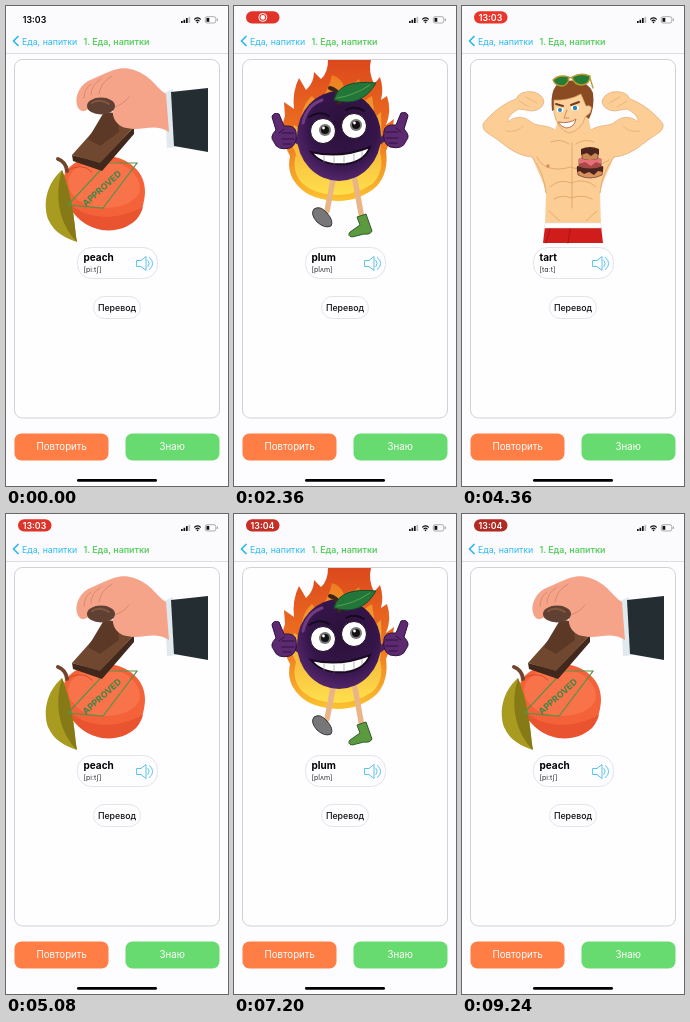
Animation of 222x480 px, one loop 9.28 s. Source, as an HTML page:

```html
<!DOCTYPE html>
<html lang="ru">
<head>
<meta charset="utf-8">
<style>
  html, body { margin: 0; width: 100%; height: 100%; overflow: hidden; background: #fdfcfe; }
  svg { display: block; width: 100%; height: 100%; }
  text { font-family: Inter, "Noto Sans", sans-serif; }
  .frame { fill: #fefdff; stroke: #d3d0d6; }
  .chip { fill: #fefdff; stroke: #e6e2ea; }
  .line { fill: none; stroke-linecap: round; stroke-linejoin: round; }
  .mid { text-anchor: middle; }
</style>
</head>
<body>
<svg viewBox="0 0 222 480">
  <defs>
    <linearGradient id="fire" x2="0" y2="1">
      <stop stop-color="#dc481d"/>
      <stop offset=".55" stop-color="#ee7420"/>
      <stop offset="1" stop-color="#fbc32f"/>
    </linearGradient>
    <linearGradient id="innerFire" x2="0" y2="1">
      <stop stop-color="#ee7d20"/>
      <stop offset="1" stop-color="#fee04d"/>
    </linearGradient>
    <radialGradient id="skin" cx=".55" cy=".4" r=".62">
      <stop stop-color="#2a1038"/>
      <stop offset=".65" stop-color="#35154a"/>
      <stop offset="1" stop-color="#55276d"/>
    </radialGradient>

    <g id="peach">
      <path fill="#f4623a" d="M57 178C56 160 75 150 98 150C122 150 140 166 139 187C138 200 134 210 130 214C120 223 105 226 92 222C72 219 58 198 57 178Z"/>
      <path fill="#f9734a" d="M62 176C64 161 80 154 98 155C120 155 135 169 134 185C126 205 88 206 72 194C66 189 62 183 62 176Z"/>
      <path fill="#e9532f" d="M60 194C78 214 108 216 137 201C134 212 126 218 117 222C94 230 70 218 60 194Z"/>
      <path class="line" stroke="#d94a2c" d="M59 166Q76 155 86 166"/>
      <path class="line" stroke="#70452b" stroke-width="4" d="M52 153Q60 156 61 165"/>
      <path fill="#a99a20" d="M56 164C40 178 37 198 42 213C48 227 60 232 71 236C68 218 68 194 56 164Z"/>
      <path fill="#857a16" d="M56 164C48 190 53 218 71 236C68 218 68 194 56 164Z"/>
      <path fill="none" stroke="#5a9147" stroke-width="1.2" d="M62 199L101 157H131L97 202Z"/>
      <text transform="translate(80 201) rotate(-42)" font-size="8.8" font-weight="700" fill="#398746">APPROVED</text>
      <path fill="#41281c" d="M66 149L94 156L128 121V128L96 165L67 155Z"/>
      <path fill="#70482f" d="M66 149L99 112L128 121L94 157Z"/>
      <path fill="#5c3927" d="M82 133L98 106L111 107L113 126L94 140Z"/>
      <path fill="#e0eaee" d="M158 87L167 83L171 141L161 142Z"/>
      <path fill="#242e32" d="M165 86L202 82V146L168 140Z"/>
      <path fill="#f5a489" d="M160 88C150 82 146 70 128 64C116 60 108 64 100 67L82 75C72 81 69 92 71 99C73 107 80 107 85 100C91 91 102 92 108 101C104 110 111 121 121 122C136 126 148 116 163 126Z"/>
      <path class="line" stroke="#d88b6d" d="M85 78Q78 83 78 92M95 73Q85 79 85 89M106 70Q94 77 93 88M108 101Q117 99 123 91"/>
      <ellipse cx="95" cy="100" rx="14" ry="8.5" fill="#604032"/>
      <path class="line" stroke="#805640" stroke-width="2" d="M86 97Q94 92 103 98"/>
    </g>

    <g id="plum">
      <path fill="url(#fire)" d="M56 150Q44 128 51 110L50 96L60 103Q58 86 65 72L72 84Q80 77 80 66L87 73Q94 67 94 54H137Q134 65 140 78L146 71Q150 83 147 94L153 90Q158 105 152 119L160 113Q158 132 152 145Q155 166 143 180Q126 195 104 195Q77 194 65 181Q52 168 56 150Z"/>
      <path fill="url(#innerFire)" d="M62 148Q54 133 60 119L67 123Q66 100 78 90L84 97Q95 85 98 69Q109 72 111 85L125 73L130 95L138 90L141 111L147 106Q148 130 146 146Q151 166 138 178Q122 189 104 189Q82 189 69 178Q57 166 62 148Z"/>
      <path class="line" stroke="#eab586" stroke-width="5.5" d="M99 174L93 205M121 174L128 213"/>
      <path fill="#77777a" stroke="#39393c" d="M80 203Q86 199 93 207Q100 215 97 220Q91 223 83 216Q76 208 80 203Z"/>
      <path fill="#5c9a40" stroke="#335d2d" d="M123 211L132 208L138 225Q136 229 130 228L118 231Q113 230 116 226L126 219Z"/>
      <path class="line" stroke="#492359" stroke-width="6" d="M57 131L67 137M154 129L145 136"/>
      <g id="thumb" fill="#5d2a72" stroke="#2d123c">
        <path d="M42 124L38 111Q39 106 45 108L50 120Q61 119 62 126Q64 138 56 142Q43 145 40 136Q35 131 42 124Z"/>
        <path class="line" d="M50 123L45 127M60 127H48M60 133H48M57 138H49"/>
      </g>
      <use href="#thumb" transform="translate(212 -1) scale(-1 1)"/>
      <ellipse cx="105" cy="130" rx="42" ry="45" fill="url(#skin)"/>
      <path class="line" stroke="#6f3b83" stroke-width="3" d="M69 117Q73 99 88 94"/>
      <path class="line" stroke="#3e251a" stroke-width="4" d="M105 97Q107 85 96 82"/>
      <path fill="#23763a" stroke="#174f2a" d="M100 94Q105 73 142 77Q128 102 100 94Z"/>
      <path class="line" stroke="#59a24a" d="M103 92Q119 90 136 79"/>
      <g id="eye">
        <circle cx="89" cy="125" r="12.5" fill="#fff" stroke="#1c0a25"/>
        <circle cx="91" cy="124" r="6" fill="#777"/>
        <circle cx="91" cy="124" r="4" fill="#111"/>
        <circle cx="89.5" cy="122" r="1.4" fill="#fff"/>
      </g>
      <use href="#eye" x="31" y="-5"/>
      <path class="line" stroke="#160a1c" stroke-width="2" d="M75 111Q86 104 95 110M112 104Q121 99 130 105"/>
      <path fill="#fff" stroke="#190a20" stroke-width="2" d="M77 146Q106 153 136 141Q131 155 112 158Q88 160 77 146Z"/>
      <path class="line" stroke="#999" stroke-width=".7" d="M90 150V156M100 151V158M110 150V157M120 148V155M128 145V151"/>
    </g>

    <g id="tart">
      <g id="arm" stroke="#e3b278" stroke-width=".8">
        <path fill="#fccd95" d="M93 124C84 118 75 121 69 116C60 108 50 112 46 116C45 111 51 106 57 103L70 105Q80 104 82 96Q81 89 72 86Q58 84 54 93C42 97 28 108 21 118Q20 124 27 128C41 136 50 149 70 151L92 155Z"/>
        <path class="line" d="M57 95L67 101M64 91L75 97M44 125Q55 127 61 120"/>
      </g>
      <use href="#arm" transform="translate(222 0) scale(-1 1)"/>
      <path fill="#fccd95" d="M96 114L93 124Q78 125 70 134C66 154 80 167 84 187L83 220H139L138 187C142 167 156 154 152 134Q144 125 129 124L126 110Z"/>
      <path class="line" stroke="#dfa76d" stroke-width=".9" d="M70 151Q82 166 84 187M152 151Q140 166 138 187M75 151Q83 168 109 161Q124 169 147 154M110 137V202M88 181Q98 172 109 177Q123 171 134 181M92 193Q101 188 109 192Q121 188 130 193M87 205L98 215M135 205L124 215M89 136Q99 132 107 138M132 136Q122 132 114 138"/>
      <circle cx="86" cy="160" r="1.7" fill="#d08d60"/>
      <path fill="#d11c1c" d="M83 220H139L141 237H81Z"/>
      <path fill="#fff" stroke="#ddd" stroke-width=".5" d="M83 217H139V222H82Z"/>
      <path class="line" stroke="#a91419" d="M108 223L106 237M88 223L84 237"/>
      <path fill="#8b4b22" d="M90 105Q87 77 103 75Q125 72 131 87Q133 101 127 113L122 109L119 91Z"/>
      <path fill="#fdd19b" stroke="#d69c60" stroke-width=".7" d="M92 94Q106 95 119 88L124 100Q132 98 128 107L123 111Q121 123 107 127Q95 123 92 107Z"/>
      <path class="line" stroke="#713c1f" stroke-width="2" d="M94 98L101 100M109 99L117 96"/>
      <ellipse cx="98" cy="104" rx="3.5" ry="2.2" fill="#fff"/>
      <ellipse cx="113" cy="102" rx="4" ry="2.4" fill="#fff"/>
      <circle cx="98" cy="104" r="2" fill="#2487b7"/>
      <circle cx="113" cy="102" r="2.2" fill="#2487b7"/>
      <path class="line" stroke="#d28b58" d="M105 104L102 112L107 112"/>
      <path fill="#fff" stroke="#bd7048" d="M96 116Q107 118 114 113Q112 122 104 122Q99 121 96 116Z"/>
      <g fill="#267c35" stroke="#b99a33" stroke-width="1.3">
        <path d="M91 74Q97 68 107 71Q107 78 101 80Q93 80 91 74Z"/>
        <path d="M110 71Q119 66 128 70Q128 78 120 79Q112 79 110 71Z"/>
        <path class="line" d="M106 73Q108 70 111 73M128 72L131 82"/>
      </g>
      <g stroke="#6a3528" stroke-width=".7">
        <path fill="#d9905e" d="M115 161H141L140 169Q128 175 116 169Z"/>
        <path fill="#a64a48" d="M117 153H139V162Q128 166 117 162Z"/>
        <path fill="#c88755" d="M120 145H136V153Q128 156 120 153Z"/>
      </g>
      <path fill="#4c241d" d="M115 160Q128 165 141 160V166L136 165L132 169L127 166L122 168L118 165L115 166ZM119 143Q128 139 137 143V149L133 147L129 150L125 147L119 149Z"/>
      <path fill="#e66f79" d="M117 152Q128 156 139 152V158L134 156L129 160L123 156L117 158Z"/>
    </g>

    <g id="speaker" class="line" stroke="#58c3ec">
      <path d="M131 254.5H135L140 250.5V264.5L135 260.5H131Z"/>
      <path d="M142 254.5Q144.5 257.5 142 260.5M143.5 251.5Q150 257.5 143.5 263.5"/>
    </g>
  </defs>

  <g id="cards"></g>

  <rect width="222" height="47" fill="#fbfafc"/>
  <path d="M0 47.5H222" stroke="#dfdde1"/>
  <path class="line" stroke="#2bb8ee" stroke-width="1.7" d="M12 30.5L7.5 35L12 39.5"/>
  <text x="16" y="38.5" font-size="8.8" fill="#2bbbed">Еда, напитки</text>
  <text x="77.5" y="38.5" font-size="8.9" font-weight="600" fill="#5bce61">1. Еда, напитки</text>

  <path fill="#111" d="M175 15h1.7v2h-1.7zM177.5 13.7h1.7v3.3h-1.7zM180 12h1.7v5h-1.7z"/>
  <path fill="#bbb" d="M182.5 10.8h1.7v6.2h-1.7z"/>
  <path class="line" stroke="#111" stroke-width="1.2" d="M188.6 13.1Q191.5 10.5 194.4 13.1M190 14.8Q191.5 13.4 193 14.8"/>
  <circle cx="191.5" cy="16.4" r=".8" fill="#111"/>
  <rect x="199.3" y="10.7" width="10.5" height="6.3" rx="1.8" fill="none" stroke="#999" stroke-width=".8"/>
  <path fill="#111" d="M200.5 11.9h2.8v3.9h-2.8z"/>
  <path fill="#999" d="M210.8 12.6h1v2.5h-1z"/>

  <rect id="pill" x="12" y="5.2" width="33.5" height="12.3" rx="6.1"/>
  <g id="record">
    <circle cx="28.8" cy="11.4" r="4" fill="none" stroke="#fff"/>
    <circle cx="28.8" cy="11.4" r="2.3" fill="#fff"/>
  </g>
  <text id="clock" class="mid" x="28.5" font-size="8.8" font-weight="600"></text>

  <rect x="8.5" y="427.5" width="94" height="27" rx="7" fill="#ff7e45"/>
  <rect x="119.5" y="427.5" width="94" height="27" rx="7" fill="#68db70"/>
  <g class="mid" font-size="9.7" fill="#fff">
    <text x="55.7" y="444">Повторить</text>
    <text x="166.2" y="444">Знаю</text>
  </g>
  <rect x="71" y="473" width="80" height="2.8" rx="1.4"/>
</svg>

<script>
const LOOP = 9280, PAGE = 222, SWIPE = 320, PULSE = 1850;
const swipeStarts = [1284, 2890, 4400, 5830, 7470, 8740];
const words = [["peach", "[pi:tʃ]"], ["plum", "[plʌm]"], ["tart", "[tɑ:t]"]];
const byId = id => document.getElementById(id);
const clamp = v => Math.max(0, Math.min(1, v));
const easeOut = p => 1 - (1 - p) ** 3;
const show = (el, on) => el.setAttribute("visibility", on ? "visible" : "hidden");

byId("cards").innerHTML = words.map(([word, sound]) => `
  <g>
    <rect class="frame" x="8.5" y="53.5" width="205" height="358.5" rx="8"/>
    <use href="#${word}"/>
    <rect class="chip" x="71.5" y="241.5" width="80" height="31" rx="14"/>
    <text x="77.5" y="255" font-size="10" font-weight="700">${word}</text>
    <text x="77.5" y="266" font-size="7" fill="#333">${sound}</text>
    <use href="#speaker"/>
    <rect class="chip" x="87.5" y="290.5" width="47" height="22" rx="11"/>
    <text class="mid" x="111" y="305" font-size="8.8" font-weight="500" fill="#111">Перевод</text>
  </g>`).join("");

const cards = [...byId("cards").children];
const pill = byId("pill"), record = byId("record"), clock = byId("clock");

function drawStatus(t) {
  const recording = t >= 500, timeShown = !recording || t >= 4000;
  const glow = Math.sqrt(0.5 - 0.5 * Math.cos(2 * Math.PI * t / PULSE));
  const channel = (dark, bright) => Math.round(dark + (bright - dark) * glow);
  pill.setAttribute("fill", `rgb(${channel(176, 240)},${channel(42, 54)},${channel(34, 44)})`);
  show(pill, recording);
  show(record, !timeShown);
  show(clock, timeShown);
  clock.textContent = t < 5600 ? "13:03" : "13:04";
  clock.setAttribute("fill", recording ? "#fff" : "#000");
  clock.setAttribute("y", recording ? 14.7 : 16.6);
}

function draw(now) {
  const t = now % LOOP;
  const page = swipeStarts.reduce((sum, start) => sum + easeOut(clamp((t - start) / SWIPE)), 0);
  cards.forEach((card, i) => {
    // Wrap each card to the nearest side of the viewport.
    const offset = (i - page + 7.5) % 3 - 1.5;
    card.setAttribute("transform", `translate(${(offset * PAGE).toFixed(2)} 0)`);
  });
  drawStatus(t);
}

const startTime = performance.now();
function tick() {
  draw(performance.now() - startTime);
  requestAnimationFrame(tick);
}
tick();
</script>
</body>
</html>
```
